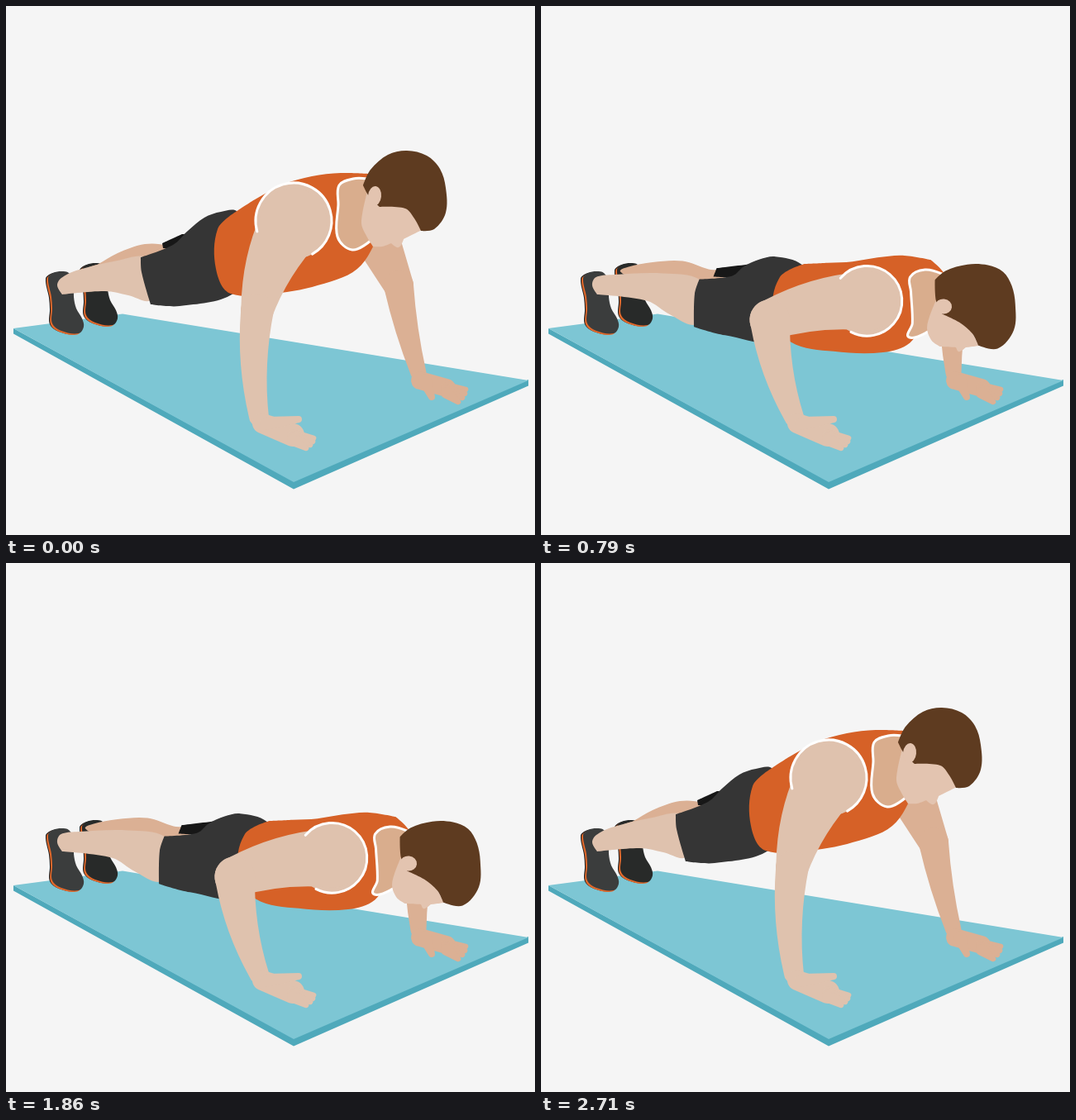
An HTML page with a canvas for the animation above (2930 ms loop, 640 px wide and 640 px high).

```html
<!DOCTYPE html>
<html lang="en">
<head>
<meta charset="utf-8">
<title>Push-up</title>
<style>
html, body { margin: 0; width: 100%; height: 100%; overflow: hidden; background: #f5f5f5; }
canvas { display: block; width: 640px; height: 640px; }
</style>
</head>
<body>
<canvas id="stage" width="640" height="640"></canvas>
<script>
const ctx = document.getElementById('stage').getContext('2d');
const LOOP = 2930, FPS = 14, STEPS = 41;
const SKIN = '#dfc2ae', FAR_SKIN = '#dbb094', FACE = '#e3c4b0', NECK = '#d9ad8d';
const HAIR = '#5e3b20', VEST = '#d66127', SHORTS = '#353535';

const parse = s => s.split(' ').map(Number);
const mix = (a, b, s) => a + (b - a) * s;

// Sideways travel slows down on the way to the floor, the drop is even.
const easeOut = (s, power) => 1 - (1 - s) * Math.abs(1 - s) ** (power - 1);

// An outline with a high and a low pose; power sets the sideways easing.
function shape(high, low, color, corners = [], power = 2) {
  const a = parse(high), b = parse(low);
  return { color, corners, at: s => a.map((v, i) => mix(v, b[i], i % 2 ? s : easeOut(s, power))) };
}

const farLeg = shape(
  '97 320 112 312 135 299 168 288 196 290 215 300 165 315 110 322',
  '96 322 104 317 135 314 172 316 204 329 225 332 215 345 120 332', FAR_SKIN, [], 1.4);
const farShorts = shape(
  '189 287 213 276 235 275 215 295 190 293',
  '217 328 264 325 270 330 240 341 212 340', '#171717', [0, 1, 2, 3, 4], 1.4);
const nearLeg = shape(
  '62 338 67 329 85 320 135 308 170 304 190 330 176 356 148 350 120 345 68 349',
  '62 338 66 328 85 327 150 329 197 341 210 370 190 396 158 382 130 361 68 349', SKIN, [5, 9], 1.4);
const shorts = shape(
  '163 304 202 289 220 272 240 256 260 249 280 249 310 300 275 348 210 363 175 361 164 322',
  '197 340 237 340 250 331 269 325 288 323 322 336 340 360 300 425 225 411 187 398 190 358', SHORTS, [0, 9], 1.4);
const torso = shape(
  '278 249 303 233 335 216 370 206 405 202 441 203 460 250 441 297 425 318 400 331 340 346 272 348 254 318 256 270',
  '322 335 350 339 380 343 410 340 440 338 474 345 495 366 470 400 448 440 415 451 355 444 305 428 283 395 291 350',
  VEST, [0, 5]);
const neck = shape(
  '437 209 420 209 403 217 402 240 401 279 419 295 441 284 450 230',
  '489 366 468 359 450 368 451 384 453 422 447 439 470 434 492 400', NECK, [0, 6]);
const face = shape(
  '437 225 430 262 436 278 444 291 455 291 466 287 475 292 481 282 503 271 484 238 455 235',
  '481 404 470 433 475 450 486 456 500 457 505 459 508 464 516 461 532 462 510 425 492 415', FACE, [0, 3, 5, 7, 8]);
const hair = shape(
  '432 217 441 198 462 180 485 175 509 181 525 197 532 220 532 250 518 270 502 272 494 257 483 245 452 243 439 230',
  '480 373 493 365 520 361 545 364 563 373 573 390 577 412 575 444 555 467 531 461 524 447 508 433 488 420 481 403',
  HAIR, [0, 9, 12]);
const shoe = parse('67 321 76 323 82 334 82 352 85 366 92 378 94 388 88 396 67 393 56 384 56 366 55 352 51 329 57 323');

// Rounded outline through the points; corners stay sharp.
function trace(pts, corners = [], segments = pts.length / 2) {
  const n = pts.length / 2;
  const pt = i => { const k = (i + n) % n; return [pts[2 * k], pts[2 * k + 1]]; };
  const dir = i => {
    if (corners.includes(i % n)) return [0, 0];
    const a = pt(i - 1), b = pt(i + 1);
    const d = Math.hypot(b[0] - a[0], b[1] - a[1]) || 1;
    return [(b[0] - a[0]) / d, (b[1] - a[1]) / d];
  };
  ctx.beginPath();
  ctx.moveTo(...pt(0));
  for (let i = 0; i < segments; i++) {
    const a = pt(i), b = pt(i + 1), da = dir(i), db = dir(i + 1);
    const r = Math.hypot(b[0] - a[0], b[1] - a[1]) / 3;
    ctx.bezierCurveTo(a[0] + da[0] * r, a[1] + da[1] * r, b[0] - db[0] * r, b[1] - db[1] * r, b[0], b[1]);
  }
}

function fill(color) {
  ctx.fillStyle = color;
  ctx.fill();
}

function piping() {
  ctx.strokeStyle = '#fff';
  ctx.lineWidth = 3;
  ctx.stroke();
}

function blob(form, s) {
  trace(form.at(s), form.corners);
  fill(form.color);
}

function poly(s, color) {
  const p = parse(s);
  ctx.beginPath();
  for (let i = 0; i < p.length; i += 2) ctx.lineTo(p[i], p[i + 1]);
  fill(color);
}

function drawShoe(dx, dy, color) {
  const layer = (x, y, c) => {
    trace(shoe.map((v, i) => v + (i % 2 ? dy + y : dx + x)));
    fill(c);
  };
  layer(-3, 1, '#1c1c1c');
  layer(-1.9, 1.5, '#e0682b');
  layer(0, 0, color);
}

// Tapered limb between two joints [x, y, radius], optionally bent sideways.
function limb(a, b, color, bow = 0) {
  const dx = b[0] - a[0], dy = b[1] - a[1];
  const turn = Math.atan2(dy, dx), spread = Math.acos((a[2] - b[2]) / Math.hypot(dx, dy));
  const on = (j, angle) => [j[0] + j[2] * Math.cos(angle), j[1] + j[2] * Math.sin(angle)];
  const side = (angle, end) => {
    const p = on(a, angle), q = on(b, angle);
    ctx.quadraticCurveTo(
      (p[0] + q[0]) / 2 - 2 * bow * Math.sin(turn), (p[1] + q[1]) / 2 + 2 * bow * Math.cos(turn),
      ...(end === a ? p : q));
  };
  ctx.beginPath();
  ctx.arc(...a, turn + spread, turn - spread);
  side(turn - spread, b);
  ctx.arc(...b, turn - spread, turn + spread);
  side(turn + spread, a);
  fill(color);
}

function hand(wrist, knuckle, thumb, tip, gap, color) {
  limb(wrist, knuckle, color);
  limb([wrist[0] + 6, wrist[1], 8], thumb, color);
  for (let i = 0; i < 4; i++) {
    limb([knuckle[0], knuckle[1] + 2 * i, 7], [tip[0] - i * i, tip[1] + gap * i, 3.3], color);
  }
}

function drawFarArm(s) {
  const wrist = [499, 444, 9.5];
  const elbow = [mix(475, 509, s), 338 + 2 * s + 80 * s * (1 - s), 18];
  limb([mix(452, 470, s), mix(288, 362, s), 26], elbow, FAR_SKIN);
  limb(elbow, wrist, FAR_SKIN, 2);
  hand([501, 453, 11], [533, 462, 11], [515, 473, 4], [556, 464], 5, FAR_SKIN);
}

function drawNearArm(s) {
  const wrist = [306, 497, 12];
  const shoulder = [mix(348, 398, easeOut(s, 2)), mix(260, 392, s), mix(46, 41, s)];
  const elbow = [mix(304, 283, s) - 60 * s * (1 - s), mix(368, 384, s), mix(20, 26, s)];
  const root = [shoulder[0], shoulder[1], shoulder[2] - 6];
  const turn = Math.atan2(elbow[1] - root[1], elbow[0] - root[0]);
  ctx.beginPath();
  ctx.arc(...shoulder, 0, 2 * Math.PI);
  fill(SKIN);
  limb(root, elbow, SKIN, 6);
  limb(elbow, wrist, SKIN, 5);
  hand([310, 505, 12], [347, 519, 14], [354, 500, 4], [372, 523], 4, SKIN);
  ctx.beginPath();
  ctx.arc(...shoulder, turn + 0.9, turn - 0.9);
  piping();
}

function drawHead(s) {
  blob(face, s);
  blob(hair, s);
  ctx.beginPath();
  ctx.ellipse(mix(446, 490, easeOut(s, 2)), mix(230, 412, s), mix(8, 11, s), mix(12, 8, s), 0.1, 0, 2 * Math.PI);
  fill(FACE);
}

function draw(s) {
  ctx.fillStyle = '#f5f5f5';
  ctx.fillRect(0, 0, 640, 640);
  poly('9 390 348 575 632 452 632 459.5 348 584.5 9 396.5', '#4fa9bb');
  poly('9 390 141 372.5 632 453 348 576', '#7dc6d4');

  drawShoe(41, -10, '#282a29');
  blob(farLeg, s);
  blob(farShorts, s);
  drawFarArm(s);

  drawShoe(0, 0, '#3b3d3d');
  blob(nearLeg, s);
  blob(shorts, s);
  blob(torso, s);
  blob(neck, s);
  trace(neck.at(s), neck.corners, s > 0.8 ? 5 : 6);
  piping();
  drawNearArm(s);
  drawHead(s);
}

// Even descent, a soft stop at the floor, the same way back up and a rest.
function depth(step) {
  const d = Math.min(step, Math.max(37 - step, (38 - step) / 2, 0));
  return d <= 15 ? d / 15 : 1 + 0.07 * (1 - ((18 - d) / 3) ** 2);
}

function tick(ms) {
  draw(depth(Math.floor((ms % LOOP + 5.01) * FPS / 1000) % STEPS));
  requestAnimationFrame(tick);
}
ctx.lineCap = ctx.lineJoin = 'round';
draw(0);
requestAnimationFrame(tick);
</script>
</body>
</html>
```
